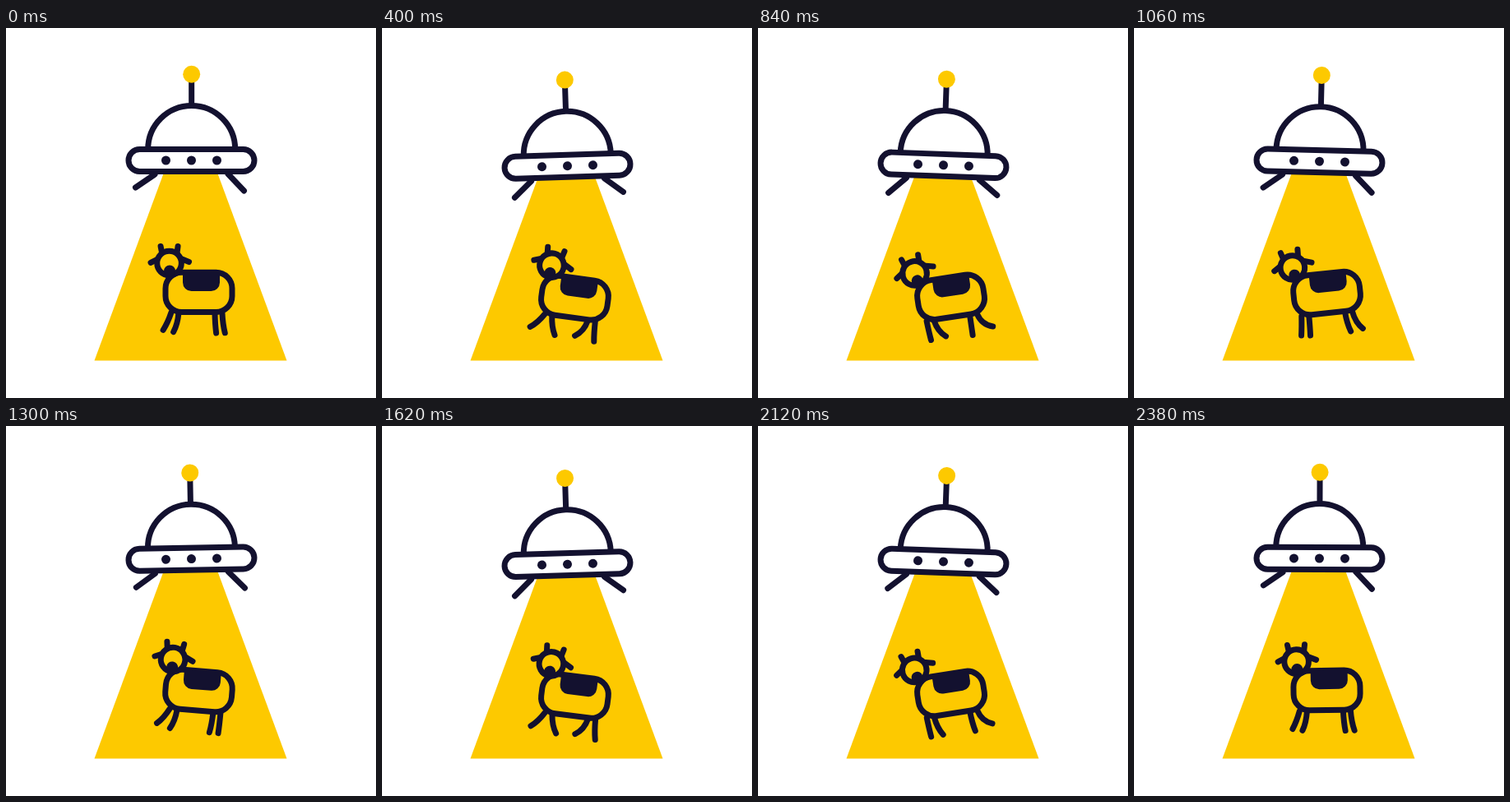
An HTML page for the animation above (2400 ms loop, 450 by 450 pixels).

```html
<!DOCTYPE html>
<html lang="en">
<head>
<meta charset="utf-8">
<title>Abduction</title>
<style>
  html, body { margin: 0; width: 100%; height: 100%; overflow: hidden; background: #fff; }
  svg { display: block; width: 100vw; height: 100vh; }
  .line { fill: none; stroke: #13112f; stroke-width: 7; stroke-linecap: round; stroke-linejoin: round; }
  .hull { fill: #fff; }
  .dark { fill: #13112f; }
  .glow { fill: #fdc900; }
</style>
</head>
<body>
<svg viewBox="0 0 450 450">
  <path class="glow" d="M196 165H253L341.5 404.5H107.5Z"/>

  <g id="ufo">
    <path class="line" id="strutL" d="M181 178L157.5 194" stroke-width="6"/>
    <path class="line" id="strutR" d="M270 177.5L289.5 198" stroke-width="6"/>
    <path class="line" d="M225.7 64V94"/>
    <circle class="glow" cx="225.7" cy="56.3" r="10.5"/>
    <path class="line hull" d="M172.7 147.5A53 53 0 0 1 278.7 147.5"/>
    <rect class="line hull" x="149" y="147.5" width="153" height="27" rx="13.5"/>
    <circle class="dark" cx="194.5" cy="161" r="5.5"/>
    <circle class="dark" cx="225.5" cy="161" r="5.5"/>
    <circle class="dark" cx="256.5" cy="161" r="5.5"/>
  </g>

  <g id="cow">
    <g id="legs"></g>
    <rect class="line" x="194" y="297.3" width="81" height="48.2" rx="19.5"/>
    <path class="dark" d="M215 297H260V309.5A10.5 10.5 0 0 1 249.500 320H225.500A10.5 10.5 0 0 1 215 309.500Z"/>
    <g id="head">
      <path class="line" d="M188 265.500L189.500 273M209 265.500L208 273M176 285.500L184 281.500M214 281L222.500 284.500"/>
      <circle class="line glow" cx="198.500" cy="286" r="14.800"/>
      <circle class="dark" cx="199" cy="295.500" r="7"/>
    </g>
  </g>
</svg>
<script>
const PERIOD = 1200;
const RAD = Math.PI / 180;
const $ = id => document.getElementById(id);

// hip x, hip y, length, mean angle, swing, peak phase, knee follow
const legs = [
  [201, 346, 23.5, 21, 26, 82, 0.75],
  [210, 346.5, 24, -11, 28, 21, 0.35],
  [254, 346.5, 24.5, 11, 22, 133, 0.35],
  [263, 346.5, 24.5, -18.5, 25, 65, 0.35]
].map(spec => {
  const path = document.createElementNS('http://www.w3.org/2000/svg', 'path');
  path.setAttribute('class', 'line');
  $('legs').append(path);
  return { path, spec };
});

const turn = (id, angle, x, y, dy = 0) =>
  $(id).setAttribute('transform', `translate(0 ${dy}) rotate(${angle} ${x} ${y})`);

// Point at a distance below the hip; positive angles swing to the left.
const swing = (x, y, dist, angle) =>
  `${x - dist * Math.sin(angle * RAD)} ${y + dist * Math.cos(angle * RAD)}`;

function draw(time) {
  const phase = (time % PERIOD) / PERIOD * 360;
  const sway = Math.sin(phase * RAD);
  const sink = (1 - Math.cos(phase * RAD)) / 2;

  turn('ufo', -2.15 * sway, 225.5, 161, 9 * sink);
  turn('strutL', -11.7 * sink, 181, 178);
  turn('strutR', -11.7 * sink, 270, 177.5);
  turn('cow', 9 * sway, 234.7, 321, 9 * sink);
  turn('head', 8.8 * sway, 199, 308);

  for (const { path, spec: [x, y, len, mean, amp, peak, knee] } of legs) {
    const angle = mean + amp * Math.cos((phase - peak) * RAD);
    path.setAttribute('d',
      `M${x} ${y}Q${swing(x, y, len * 0.58, angle * knee)} ${swing(x, y, len, angle)}`);
  }
}

const start = performance.now();
function tick() {
  draw(performance.now() - start);
  requestAnimationFrame(tick);
}
draw(0);
requestAnimationFrame(tick);
</script>
</body>
</html>
```
